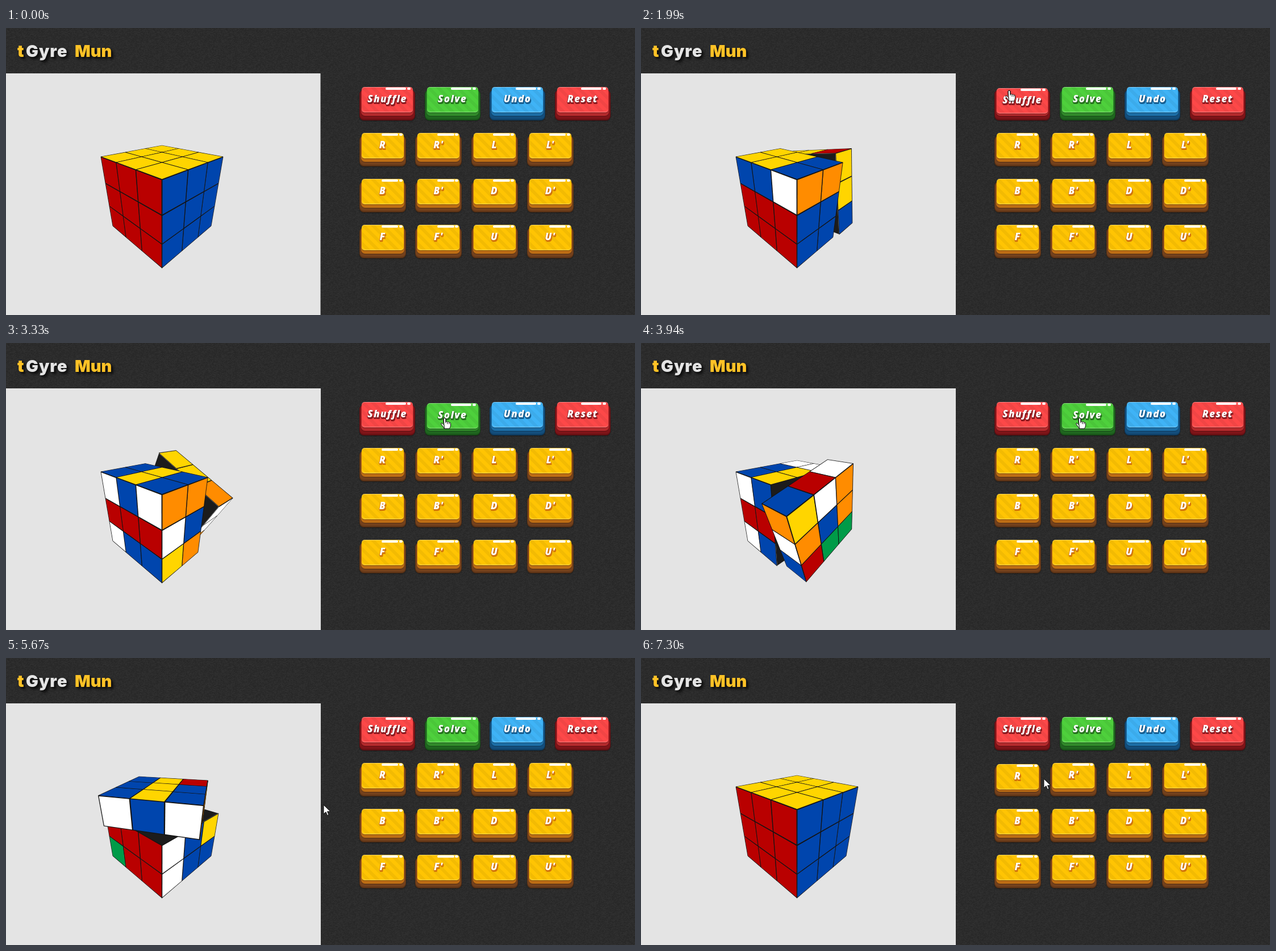
Recreate the animation shown at these times as an HTML page with a canvas. Size 1107x506 px, loop 7.35 s.

```html
<!DOCTYPE html>
<html lang="en">
<head>
<meta charset="utf-8">
<title>Cube player</title>
<style>
html, body { margin: 0; width: 100%; height: 100%; overflow: hidden; background: #2b2b2b; }
#stage { position: relative; width: 1107px; height: 506px; overflow: hidden; }
canvas, .btn, .btn *, h1 span, svg { position: absolute; }
canvas { left: 0; top: 0; }
h1 { margin: 0; font: 900 29px/36px Inter, "Open Sans", sans-serif; color: #ffc226; text-shadow: 2px 2px 2px #111, 4px 4px 4px #111; }
h1 span { top: 23px; white-space: nowrap; }
.btn { height: 54px; border-radius: 8px; background: var(--base); box-shadow: inset 0 0 0 1px #0003, inset 0 -3px 0 #00000026, 0 1px 2px #0006; }
.side { left: 3px; right: 3px; top: -3px; bottom: 8px; border-radius: 7px; background: var(--side); box-shadow: 0 1px 0 #0004; }
.face {
  left: 4px; right: 4px; top: -5px; height: 45px; border-radius: 5px; text-align: center; color: #fff;
  background: repeating-linear-gradient(45deg, #0000 0 6px, #0000000c 6px 12px) var(--face);
  box-shadow: inset 0 1px 0 #fff5, inset 0 -2px 0 #ffffff26, 0 1px 0 #0005;
  font: italic 800 17px/42px "Open Sans", "Noto Sans", sans-serif; letter-spacing: 1.4px;
  text-shadow: -1px 1px var(--ink), 1px 1px var(--ink), 1px 2px var(--ink), 0 3px var(--ink), 2px 3px var(--ink);
}
.face::before, .face::after { content: ""; position: absolute; top: 1px; height: 4px; border-radius: 2px; background: #fff; }
.face::before { left: 47%; width: 40%; }
.face::after { left: 89%; width: 6px; }
.on .face { transform: translateY(2px); }
.red { --face: #fd4848; --side: #b42a2c; --base: #7f1418; --ink: #8c1b20; }
.green { --face: #4ed03c; --side: #30892a; --base: #1f661f; --ink: #27731f; }
.blue { --face: #3fb3f6; --side: #1c6ea6; --base: #134e7c; --ink: #175f92; }
.gold { --face: #ffc403; --side: #bd6d14; --base: #74411c; --ink: #d3760c; }
svg { left: 0; top: 0; overflow: visible; fill: #fff; stroke: #111; stroke-linejoin: round; }
</style>
</head>
<body>
<div id="stage">
  <canvas width="1107" height="506"></canvas>
  <h1><span style="left:20px">t</span><span style="left:35px;color:#e4e4e4;letter-spacing:1px">Gyre</span><span style="left:121px">Mun</span></h1>
  <svg id="cursor" width="1" height="1">
    <path id="arrow" d="M0 0V16L4 12.5L6.5 18.5L9 17.4L6.5 11.7H12Z"/>
    <path id="hand" d="M-2 1.5Q0-1.5 2 1.5V7Q4 5.6 5 7.4Q7 6.2 8 8.2Q10.5 7.6 10.5 10V14Q10 16 8.5 19H-.5Q-2-0 -2 1.5ZM-2 10V1.5Q0-1.5 2 1.5V9M5 8V11M8 9V11M-2 12L-5 9Q-6.8 9-6 11L-.5 19"/>
  </svg>
</div>
<script>
const LOOP = 7350, DEG = Math.PI / 180;
const stage = document.getElementById("stage");
const ctx = document.querySelector("canvas").getContext("2d");
const cursor = document.getElementById("cursor");
const arrow = document.getElementById("arrow"), hand = document.getElementById("hand");

// Piecewise linear value from rows of [time, ...values]
function at(keys, t) {
  if (t <= keys[0][0]) return keys[0].slice(1);
  const i = keys.findIndex(k => k[0] > t);
  if (i < 0) return keys[keys.length - 1].slice(1);
  const a = keys[i - 1], b = keys[i], f = (t - a[0]) / (b[0] - a[0]);
  return a.slice(1).map((v, n) => v + (b[n + 1] - v) * f);
}

// Buttons
const buttons = [];
function addButton(label, kind, x, y, w) {
  const el = document.createElement("div");
  el.className = "btn " + kind;
  el.style.cssText = `left:${x}px;top:${y + 5}px;width:${w}px`;
  el.innerHTML = `<div class="side"></div><div class="face">${label}</div>`;
  stage.insertBefore(el, cursor);
  buttons.push({ el, x, y, w });
}
[["Shuffle", "red"], ["Solve", "green"], ["Undo", "blue"], ["Reset", "red"]]
  .forEach(([label, kind], i) => addButton(label, kind, 622 + i * 114.6, 104, 98));
["R R' L L'", "B B' D D'", "F F' U U'"].forEach((row, r) =>
  row.split(" ").forEach((label, i) => addButton(label, "gold", 622 + i * 98.3, 185 + r * 81, 82)));

// Grainy dark backdrop
function drawBackdrop() {
  const tile = document.createElement("canvas"), size = tile.width = tile.height = 128;
  const g = tile.getContext("2d");
  let seed = 7;
  for (let y = 0; y < size; y++) for (let x = 0; x < size; x += 2) {
    seed = (seed * 16807) % 2147483647;
    const v = 39 + seed % 10;
    g.fillStyle = `rgb(${v},${v},${v})`;
    g.fillRect(x + y % 2, y, 2, 1);
  }
  ctx.fillStyle = ctx.createPattern(tile, "repeat");
  ctx.fillRect(0, 0, 1107, 506);
}

// Cube model: stickers with cubie centre c and outward normal n
const FACES = { R: [0, 1], L: [0, -1], U: [1, 1], D: [1, -1], F: [2, 1], B: [2, -1] };
const COLORS = { R: "#0045ad", L: "#009b48", U: "#ffd500", D: "#fff", F: "#b90000", B: "#ff8c00" };

function rotate(v, axis, angle) {
  const j = (axis + 1) % 3, k = (axis + 2) % 3, c = Math.cos(angle), s = Math.sin(angle);
  const out = v.slice();
  out[j] = v[j] * c - v[k] * s;
  out[k] = v[j] * s + v[k] * c;
  return out;
}

function parseMove(name) {
  const [axis, side] = FACES[name[0]];
  return { axis, side, angle: (name[1] ? 1 : -1) * side * 90 * DEG };
}

function solved() {
  const list = [];
  for (const f in FACES) {
    const [axis, side] = FACES[f];
    for (let a = -1; a < 2; a++) for (let b = -1; b < 2; b++) {
      const c = [0, 0, 0], n = [0, 0, 0];
      c[axis] = n[axis] = side;
      c[(axis + 1) % 3] = a;
      c[(axis + 2) % 3] = b;
      list.push({ c, n, color: COLORS[f] });
    }
  }
  return list;
}

const shuffle = "B U B' U' F' U D' B B R".split(" ");
const undo = shuffle.slice().reverse().map(m => m[1] ? m[0] : m + "'");
const moves = shuffle.concat(undo).map(parseMove);
const states = [solved()];
for (const { axis, side, angle } of moves) {
  const turn = v => rotate(v, axis, angle).map(Math.round);
  states.push(states[states.length - 1].map(s =>
    s.c[axis] === side ? { c: turn(s.c), n: turn(s.n), color: s.color } : s));
}

// Camera
const DIST = 6.33, FOCAL = 286.1, COS = 0.8894, SIN = 0.4571, H = Math.SQRT1_2;
const EYE = [DIST * COS * H, DIST * SIN, DIST * COS * H];
function project([x, y, z]) {
  const near = (x + z) * H, scale = FOCAL / (DIST - near * COS - y * SIN);
  return [274.5 + (x - z) * H * scale, 294.7 - (y * COS - near * SIN) * scale];
}

function quad(c, n, half, color, spin, edge) {
  const u = [n[2], n[0], n[1]];
  const v = [n[1] * u[2] - n[2] * u[1], n[2] * u[0] - n[0] * u[2], n[0] * u[1] - n[1] * u[0]];
  const mid = spin(c.map((p, i) => p + n[i] / 2)), out = spin(n);
  if (out.reduce((sum, o, i) => sum + o * (EYE[i] - mid[i]), 0) <= 0) return;
  ctx.beginPath();
  for (const [a, b] of [[-1, -1], [1, -1], [1, 1], [-1, 1]])
    ctx.lineTo(...project(spin(c.map((p, i) => p + n[i] / 2 + (u[i] * a + v[i] * b) * half))));
  ctx.closePath();
  ctx.fillStyle = ctx.strokeStyle = color;
  ctx.fill();
  if (edge) ctx.stroke();
}

function drawCube(progress) {
  const i = Math.min(Math.floor(progress), moves.length - 1);
  const { axis, side, angle } = moves[i];
  ctx.fillStyle = "#e4e4e4";
  ctx.fillRect(0, 80, 553.5, 426);
  ctx.lineWidth = 0.7;
  // The eye lies beyond every slice on the positive side, so paint them in order
  for (let layer = -1; layer < 2; layer++) {
    const spin = layer === side ? v => rotate(v, axis, angle * (progress - i)) : v => v;
    for (const dir of [-1, 1]) {
      const c = [0, 0, 0], n = [0, 0, 0];
      c[axis] = layer;
      n[axis] = dir;
      quad(c, n, 1.49, "#1c1c1c", spin);
    }
    for (const s of states[i]) if (s.c[axis] === layer) {
      quad(s.c, s.n, 0.5, "#151515", spin, true);
      quad(s.c, s.n, 0.481, s.color, spin);
    }
  }
}

// Completed turns over time
const TURNS = [[1200, 0], [1490, 1], [1990, 2.883], [3330, 7.7], [3990, 10], [4422, 10],
  [4700, 10.978], [5670, 14.32], [6180, 16.128], [7285, 20]];
const POINTER = [[30, 1003, 510], [350, 740, 318], [600, 683, 222], [750, 652, 122], [900, 650, 106],
  [1200, 648, 110], [2300, 648, 110], [3000, 676, 128], [3330, 772, 132], [4250, 772, 132],
  [4650, 789, 131], [5050, 789, 131], [5500, 559, 259], [6550, 559, 259], [7000, 655, 222],
  [7200, 668, 222], [7300, 709, 213]];

const hit = (b, [x, y]) => x >= b.x && x <= b.x + b.w && y >= b.y && y <= b.y + 59;

function frame(now) {
  const t = now % LOOP;
  drawCube(at(TURNS, t)[0]);
  const pos = at(POINTER, t), before = at(POINTER, t - 50);
  const over = buttons.some(b => hit(b, pos));
  for (const b of buttons) b.el.classList.toggle("on", hit(b, before));
  cursor.style.transform = `translate(${pos[0]}px,${pos[1]}px)`;
  cursor.style.display = t < 30 ? "none" : "";
  hand.style.display = over ? "" : "none";
  arrow.style.display = over ? "none" : "";
  requestAnimationFrame(frame);
}

drawBackdrop();
requestAnimationFrame(frame);
</script>
</body>
</html>
```
